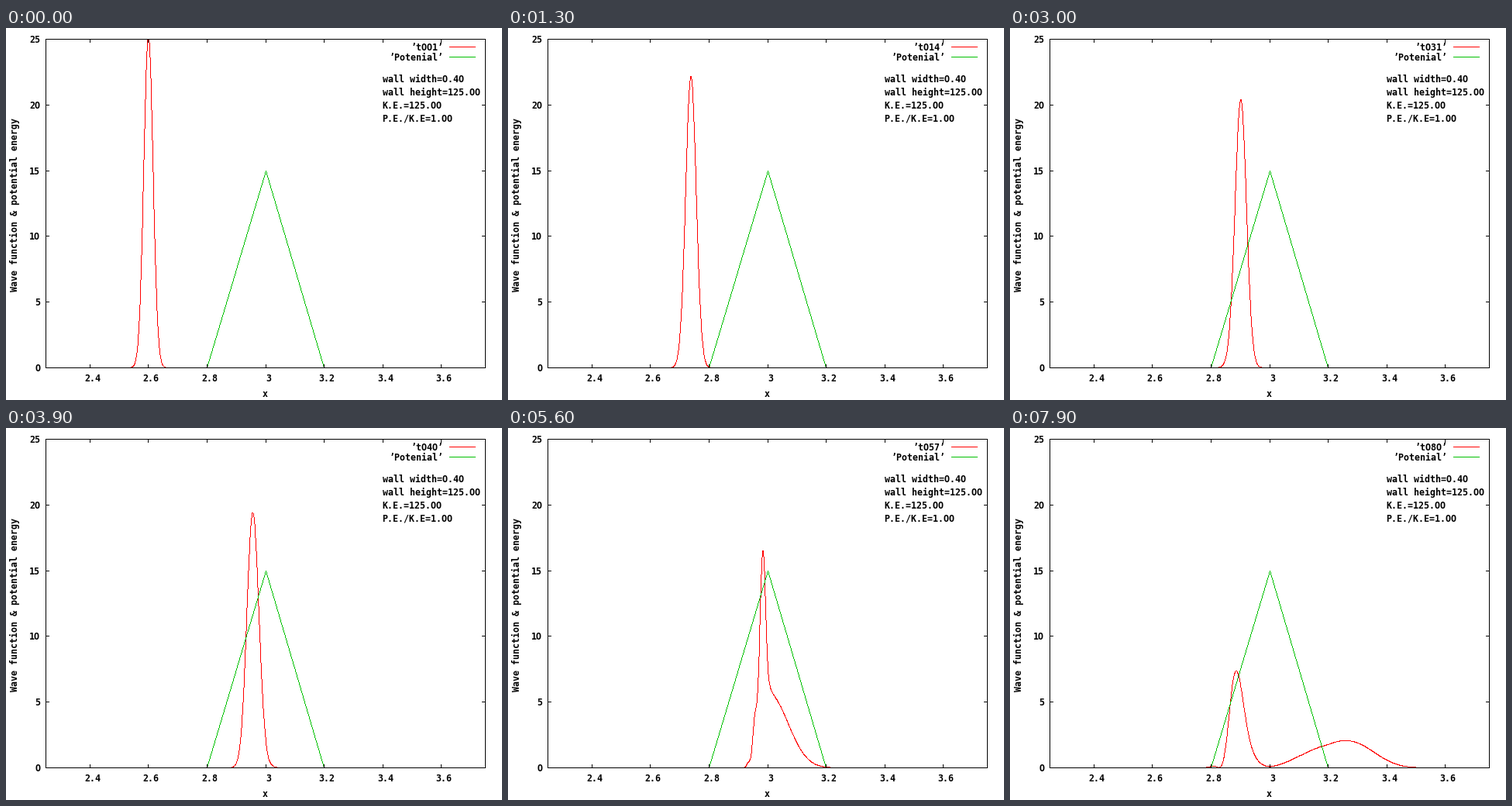
Write a matplotlib script that moves like this. It is 640x480 px and loops after 8000 ms.

```python
import numpy as np
import matplotlib as mpl
import matplotlib.pyplot as plt
from matplotlib.animation import FuncAnimation

mpl.rcParams["path.simplify"] = False

FRAMES, INTERVAL = 80, 100
LEFT, RIGHT, TOP, BOTTOM = 51, 618, 14, 438
X_MIN, X_MAX, Y_MAX = 2.25, 3.75, 25
PX = 0.72  # one pixel in points at 100 dpi
RED, GREEN = "#ff0000", "#00c000"

# Physics, with hbar = 1
MASS, K0, START = 1000, 500, 2.6
HEIGHT, HALF_WIDTH, PEAK = 125, 0.2, 3.0
N, DX = 4096, 0.0005
FRAME_TIME, SUBSTEPS = 0.0215, 20


def px(x):
    return np.floor(LEFT + (x - X_MIN) / (X_MAX - X_MIN) * (RIGHT - LEFT) + 0.5)


def py(y):
    y = np.minimum(y, Y_MAX)
    return np.floor(BOTTOM - y / Y_MAX * (BOTTOM - TOP) + 0.5)


def propagate():
    """Split-step evolution of a Gaussian packet hitting a triangular wall."""
    x = 2.0 + DX * np.arange(N)
    wall = HEIGHT * np.clip(1 - np.abs(x - PEAK) / HALF_WIDTH, 0, None)
    k = 2 * np.pi * np.fft.fftfreq(N, DX)
    kinetic = (1 - np.cos(k * DX)) / (MASS * DX**2)
    dt = FRAME_TIME / SUBSTEPS
    half_kick = np.exp(-0.5j * wall * dt)
    drift = np.exp(-1j * kinetic * dt)

    psi = np.exp(-1000 * (x - START) ** 2 + 1j * K0 * (x - START))
    psi /= np.sqrt(np.sum(np.abs(psi) ** 2) * DX)
    densities = []
    for _ in range(FRAMES):
        densities.append(np.abs(psi) ** 2)
        for _ in range(SUBSTEPS):
            psi = half_kick * np.fft.ifft(drift * np.fft.fft(half_kick * psi))
    shown = (x >= X_MIN) & (x <= X_MAX)
    return x[shown], np.array(densities)[:, shown]


def rasterize(xs, ys):
    """Turn a polyline of pixel positions into one short dash per pixel."""
    xs, ys = np.asarray(xs, float), np.asarray(ys, float)
    dx, dy = np.diff(xs), np.diff(ys)
    n = np.maximum(np.abs(dx), np.abs(dy)).astype(int)
    seg = np.repeat(np.arange(len(n)), n)
    t = (np.arange(n.sum()) - (np.cumsum(n) - n)[seg]) / n[seg]
    col = np.append(np.floor(xs[seg] + t * dx[seg] + 0.5), xs[-1])
    row = np.append(np.floor(ys[seg] + t * dy[seg] + 0.5), ys[-1])
    gap = np.full_like(col, np.nan)
    return (np.column_stack([col, col + 1, gap]).ravel(),
            np.column_stack([row + 0.5, row + 0.5, gap]).ravel())


fig = plt.figure(figsize=(6.4, 4.8), dpi=100, facecolor="white")
ax = fig.add_axes([0, 0, 1, 1])
ax.set_xlim(0, 640)
ax.set_ylim(480, 0)
ax.axis("off")


def line(xs, ys, color="black", z=5):
    return ax.plot(*rasterize(xs, ys), color=color, lw=PX, zorder=z,
                   snap=False, solid_capstyle="butt")[0]


def plain_zero(s):
    # The mono face has a dotted zero; its capital O is the plain shape.
    return s.replace("0", "O")


def label(x, y, s, ha="left", **kw):
    return ax.text(x, y, plain_zero(s), ha=ha, va="baseline", color="black",
                   family="DejaVu Sans Mono", weight="bold", size=8.37,
                   zorder=6, **kw)


# Frame and ticks
line([LEFT, RIGHT, RIGHT, LEFT, LEFT], [TOP, TOP, BOTTOM, BOTTOM, TOP])
for v in np.arange(2.4, 3.7, 0.2):
    x = px(v)
    line([x, x], [BOTTOM, BOTTOM - 4])
    line([x, x], [TOP, TOP + 4])
    label(x + 4, 456.5, f"{v:.1f}".replace("3.0", "3"), "center")
for v in range(0, 26, 5):
    y = py(v)
    line([LEFT, LEFT + 4], [y, y])
    line([RIGHT, RIGHT - 4], [y, y])
    label(44, y + 5, str(v), "right")

label(334.5, 476, "x", "center")
label(15, 227.5, "Wave function & potential energy", "center",
      rotation=90, rotation_mode="anchor")

# Key and parameters
name = label(565, 29, "", "right")
label(565, 42, "’Potenial’", "right")
line([572, 605], [24, 24], RED)
line([572, 605], [37, 37], GREEN)
info = ["wall width=0.40", "wall height=125.00", "K.E.=125.00", "P.E./K.E=1.00"]
for i, s in enumerate(info):
    label(485.5, 70 + 17 * i, s)

# Curves
corners = np.array([PEAK - HALF_WIDTH, PEAK, PEAK + HALF_WIDTH])
line(px(corners), py(np.array([0, 15, 0])), GREEN, 3)
grid, density = propagate()
columns = px(grid)
wave = line(columns, py(density[0]), RED, 2)


def update(i):
    wave.set_data(*rasterize(columns, py(density[i])))
    name.set_text(plain_zero(f"’t{i + 1:03d}’"))
    return wave, name


anim = FuncAnimation(fig, update, frames=FRAMES, interval=INTERVAL,
                     repeat=True, repeat_delay=0)
plt.show()
```
